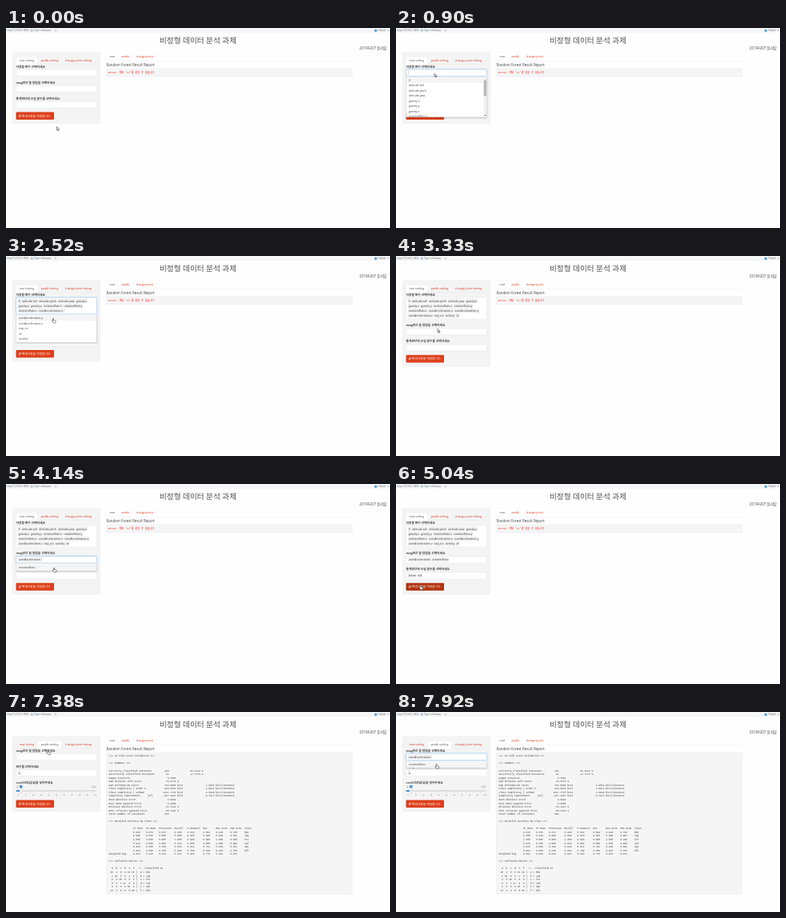
Recreate the animation shown at these times as an HTML page. Size 480 by 251 pixels, loop 8000 ms.

```html
<!DOCTYPE html>
<html lang="ko">
<head>
<meta charset="utf-8">
<title>비정형 데이터 분석 과제</title>
<style>
html, body { margin: 0; width: 100%; height: 100%; overflow: hidden; background: #fefefe; }
* { box-sizing: border-box; }
#stage {
  position: absolute; width: 1920px; height: 1004px; overflow: hidden;
  transform: scale(.25); transform-origin: 0 0; background: #fefefe;
  font: 14px/20px "Open Sans", "Noto Sans CJK KR", sans-serif; color: #444;
}
#stage > * { position: absolute; }
.bar { left: 0; top: 0; width: 100%; height: 24px; background: #f4f6f7; font-size: 11px; line-height: 24px; color: #666; }
.bar > * { position: absolute; top: 0; white-space: nowrap; }
.title { top: 36px; width: 100%; text-align: center; font-size: 38.5px; line-height: 52px; color: #505050; }
.author { top: 88px; right: 16px; font-size: 18px; line-height: 26px; }

.tabs { display: flex; gap: 2px; border-bottom: 1px solid #ddd; color: #dd3818; white-space: nowrap; }
.tabs span { padding: 0 15px; border: 1px solid transparent; border-bottom: 0; }
.tabs .on { background: #fff; color: #555; border-color: #ddd; border-radius: 4px 4px 0 0; margin-bottom: -1px; }
.side .tabs { position: absolute; left: 18px; right: 18px; top: 23px; line-height: 38px; }
.main-tabs { left: 502px; top: 120px; width: 1230px; line-height: 43px; }

.side {
  left: 32px; top: 120px; width: 440px; padding: 61px 17px 19px;
  background: #f4f4f4; border: 1px solid #e4e4e4; border-radius: 4px;
}
.group { margin-bottom: 20px; }
.group b { display: block; height: 20px; margin-bottom: 6px; font-size: 15px; white-space: nowrap; position: relative; }
.box { position: relative; }
.field {
  display: flex; flex-wrap: wrap; align-content: flex-start; min-height: 34px;
  padding: 5px 6px 2px 9px; background: #fff; border: 1px solid #ccc; border-radius: 4px;
}
.field.focus { border-color: #4fa3e0; box-shadow: 0 0 8px #66afe9aa; }
.field i { font-style: normal; height: 22px; margin: 0 3px 3px 0; padding: 1px 3px; background: #efefef; border-radius: 3px; }
.field u { width: 1px; height: 18px; margin-top: 2px; background: #777; }
.list {
  position: absolute; z-index: 5; top: 100%; left: 0; right: 0; margin-top: 2px; padding: 4px 0;
  max-height: 203px; overflow: hidden; background: #fff; border: 1px solid #bbb; box-shadow: 0 4px 8px #0003;
}
.list div { height: 26px; padding: 3px 13px; }
.list div:first-child { background: #f4f4f4; }
.scroll { position: absolute; right: 0; top: 0; width: 15px; height: 201px; background: #f1f1f1; }
.scroll::before { content: ""; position: absolute; top: 17px; left: 1px; right: 1px; height: var(--thumb); background: #b8b8b8; }
.scroll::after { content: ""; position: absolute; bottom: 5px; left: 3px; border: 5px solid transparent; border-top-color: #555; border-bottom: 0; }
.button {
  width: 190px; height: 38px; padding-left: 30px; position: relative; white-space: nowrap;
  background: #dc3f1b; color: #fff; border-radius: 4px; font-size: 15px; line-height: 37px;
}
.button.dark { background: #b2330f; }
.button svg { position: absolute; left: 12px; top: 12px; }

.slider { position: relative; height: 54px; font-size: 10px; line-height: 14px; }
.slider * { position: absolute; }
.slider span { transform: translateX(-50%); padding: 0 4px; border-radius: 3px; }
.track { top: 24px; left: 0; right: 0; height: 8px; background: #ddd; border-radius: 4px; }
.knob { top: 20px; width: 16px; height: 16px; margin-left: -8px; background: #f5f5f5; border: 1px solid #999; border-radius: 50%; }
.tick { top: 37px; width: 1px; height: 6px; background: #999; }

h4 { left: 502px; top: 172px; margin: 0; font-size: 17.7px; line-height: 24px; font-weight: 400; }
pre {
  left: 502px; top: 204px; width: 1230px; margin: 0; padding: 8px 11px; background: #f5f5f5;
  border: 1px solid #d6d6d6; border-radius: 4px;
  font: 11.9px/18.2px "Liberation Mono", "Noto Sans Mono CJK KR", "Noto Sans CJK KR", monospace;
}
pre.error { padding: 10px 9px; height: 40px; font-size: 12.6px; color: #f01010; }
#cursor { left: 0; top: 0; overflow: visible; z-index: 9; }
#cursor path { fill: #fff; stroke: #222; stroke-width: 2; }
</style>
</head>
<body>
<div id="stage">
  <div class="bar">
    <span style="left:6px">http://127.0.0.1:3896</span>
    <span style="left:116px;top:4px;width:1px;height:16px;background:#ccc"></span>
    <span style="left:125px;top:7px;width:10px;height:10px;border:2px solid #5b8fc0"></span>
    <span style="left:141px">Open in Browser</span>
    <span style="left:243px;top:7px;width:10px;height:10px;border:2px solid #9ab;border-radius:50%"></span>
    <span style="left:1842px;top:6px;width:13px;height:13px;border-radius:50%;background:#4b9bd0"></span>
    <span style="left:1861px">Publish</span>
    <span style="left:1907px;top:10px;border:4px solid transparent;border-top-color:#666"></span>
  </div>
  <div class="title">비정형 데이터 분석 과제</div>
  <div class="author">20194207 윤서담</div>
  <div class="side" id="side"></div>
  <div class="tabs main-tabs"><span class="on">mat</span><span>peakk</span><span>change point</span></div>
  <h4>Random Forest Result Report</h4>
  <pre id="report"></pre>
  <svg id="cursor" width="1" height="1"><path/></svg>
</div>
<script>
const LOOP = 8000, STEP = 90;
const RECALC = 5400, RESULT = 7020, SWITCH = 7290;
const $ = id => document.getElementById(id);
const axes = (name, letters = 'xyz') => [...letters].map(a => `${name}.${a}`);

const variables = {
  label: '사용할 변수 선택하세요', open: 900, close: 3150,
  options: ['X', 'attitude.roll', 'attitude.pitch', 'attitude.yaw', ...axes('gravity'),
    ...axes('rotationRate'), ...axes('userAcceleration'), 'exp_no', 'id', 'activity'],
  picks: [[1080, 'X'], [1260, 'attitude.roll'], [1440, 'attitude.pitch'], [1530, 'attitude.yaw'],
    [1710, 'gravity.x'], [1800, 'gravity.z'], [1980, 'gravity.y'],
    [2070, 'rotationRate.x'], [2160, 'rotationRate.y'], [2250, 'rotationRate.z'],
    [2430, 'userAcceleration.x'], [2610, 'userAcceleration.y'], [2700, 'userAcceleration.z'],
    [2790, 'exp_no'], [2970, 'activity'], [3060, 'id']]
};
const magnitude = {
  label: 'mag연산 할 컬럼을 선택하세요', open: 3420, close: 4320,
  options: ['userAcceleration', 'rotationRate'],
  picks: [[3960, 'userAcceleration'], [4230, 'rotationRate']]
};
const statistics = {
  label: '통계연산에 쓰일 함수를 선택하세요', open: 4410, close: 4950,
  options: ['mean', 'std', 'max', 'min', 'median', 'var', 'mad', 'skewness', 'kurtosis', 'sum'],
  picks: [[4590, 'mean'], [4770, 'std']]
};
const peakColumns = { ...magnitude, open: 7560, close: LOOP, picks: [[7830, 'userAcceleration']] };
const peakVariable = { label: '변수를 선택하세요', options: [], picks: [[0, 'a']] };

function selectBox({ label, options, picks, open, close }, t) {
  const chosen = picks.filter(p => p[0] <= t).map(p => p[1]);
  const rest = options.filter(o => !chosen.includes(o));
  const active = t >= open && t < close;
  const height = rest.length * 26 + 8;
  const scroll = height > 201 ? `<span class="scroll" style="--thumb:${167 * 201 / height}px"></span>` : '';
  const list = active && rest.length
    ? `<div class="list">${rest.map(o => `<div>${o}</div>`).join('')}${scroll}</div>` : '';
  return `<div class="group"><b>${label}</b><div class="box"><div class="field ${active ? 'focus' : ''}">` +
    chosen.map(c => `<i>${c}</i>`).join('') + (active ? '<u></u>' : '') + `</div>${list}</div></div>`;
}

function slider(value) {
  const at = v => 10 + v * 3.85;
  const badge = (x, text, style) => `<span style="left:${x}px;top:0;${style}">${text}</span>`;
  let scale = '';
  for (let v = 0; v <= 100; v += 5) {
    scale += `<em class="tick" style="left:${at(v)}px"></em>`;
    if (v % 10 === 0) scale += `<span style="left:${at(v)}px;top:42px">${v}</span>`;
  }
  return '<div class="group"><b>cred(신뢰값)값을 넣어주세요</b><div class="slider">' +
    badge(8, 0, 'background:#e1e1e1') + badge(at(value), value, 'background:#428bca;color:#fff') +
    badge(388, 100, 'background:#e1e1e1;color:#888') +
    `<em class="track"></em><em class="track" style="right:auto;width:${at(value)}px;background:#428bca"></em>` +
    `${scale}<em class="knob" style="left:${at(value)}px"></em></div></div>`;
}

const button = dark => `<div class="button ${dark ? 'dark' : ''}"><svg width="14" height="14">
  <path d="M2 6a5 5 0 0 1 9-2M12 8a5 5 0 0 1-9 2" fill="none" stroke="#fff" stroke-width="2.4"/>
  <path d="M13 0v6H7zM1 14V8h6z" fill="#fff"/></svg>변경사항을 적용합니다.</div>`;

function sidebar(t) {
  const peak = t >= SWITCH;
  const tabs = ['mat setting', 'peakk setting', 'change point setting']
    .map((name, i) => `<span class="${i === +peak ? 'on' : ''}">${name}</span>`).join('');
  const body = peak
    ? selectBox(peakColumns, t) + selectBox(peakVariable, t) + slider(4) + button(false)
    : [variables, magnitude, statistics].map(s => selectBox(s, t)).join('') + button(t >= 4950);
  return `<div class="tabs">${tabs}</div>${body}`;
}

function buildReport() {
  const classes = ['dws', 'jog', 'sit', 'std', 'ups', 'wlk'];
  const matrix = [[45, 2, 0, 0, 10, 15], [1, 46, 0, 0, 1, 0], [0, 0, 48, 0, 0, 0],
    [0, 0, 1, 47, 0, 0], [8, 0, 0, 0, 60, 4], [13, 4, 0, 0, 5, 50]];
  const roc = [.915, .998, 1, 1, .969, .920], prc = [.736, .981, .999, .998, .881, .762];
  const sum = a => a.reduce((x, y) => x + y, 0);
  const sizes = matrix.map(sum), total = sum(sizes);
  const hits = sum(matrix.map((row, i) => row[i]));
  const widths = [9, 9, 11, 9, 11, 9, 10, 10];
  const line = (head, cells, tail) => head.padEnd(17) + cells.map((c, i) => c.padEnd(widths[i])).join('') + tail;
  const stats = matrix.map((row, i) => {
    const tp = row[i], fn = sizes[i] - tp, fp = sum(matrix.map(r => r[i])) - tp, tn = total - tp - fn - fp;
    const recall = tp / sizes[i], precision = tp / (tp + fp);
    const mcc = (tp * tn - fp * fn) / Math.sqrt((tp + fp) * (tp + fn) * (tn + fp) * (tn + fn));
    return [recall, fp / (fp + tn), precision, recall, 2 * precision * recall / (precision + recall), mcc, roc[i], prc[i]];
  });
  const mean = widths.map((_, k) => sum(stats.map((s, i) => s[k] * sizes[i])) / total);
  const fixed = a => a.map(v => v.toFixed(3));
  // values line up on the decimal point
  const align = (value, width) => ' '.repeat(width - String(value).split('.')[0].length) + value;
  const item = (name, value, extra = '') => (name.padEnd(35) + align(value, 7)).padEnd(57) + extra;
  const info = (name, bits) => (name.padEnd(35) + align(bits.toFixed(4), 7) + ' bits').padEnd(66) +
    align((bits / total).toFixed(4), 3) + ' bits/instance';
  const percent = n => (n / total * 100).toFixed(4) + ' %';
  return ['=== 10 Fold Cross Validation ===', '', '=== Summary ===', '',
    item('Correctly Classified Instances', hits, percent(hits)),
    item('Incorrectly Classified Instances', total - hits, percent(total - hits)),
    item('Kappa statistic', '0.7851'),
    item('K&B Relative Info Score', '76.3776 %'),
    info('K&B Information Score', 703.0986),
    info('Class complexity | order 0', 920.6079),
    info('Class complexity | scheme', 1207.7776),
    info('Complexity improvement     (Sf)', -287.1697),
    item('Mean absolute error', '0.0929'),
    item('Root mean squared error', '0.2068'),
    item('Relative absolute error', '33.7112 %'),
    item('Root relative squared error', '55.7432 %'),
    item('Total Number of Instances', total), '',
    '=== Detailed Accuracy By Class ===', '',
    line('', ['TP Rate', 'FP Rate', 'Precision', 'Recall', 'F-Measure', 'MCC', 'ROC Area', 'PRC Area'], 'Class'),
    ...stats.map((s, i) => line('', fixed(s), classes[i])),
    line('Weighted Avg.', fixed(mean), ''), '',
    '=== Confusion Matrix ===', '',
    [...'abcdef'].map(c => '  ' + c).join('') + '   <-- classified as',
    ...matrix.map((r, i) => r.map(n => String(n).padStart(3)).join('') + ` |  ${'abcdef'[i]} = ${classes[i]}`)
  ].join('\n');
}

// an empty line keeps the first entries apart
const report = buildReport().replace('=== Detailed', '\n=== Detailed').replace('\n\n\n', '\n\n');
const errorText = "Error: 객체 'tr'를 찾을 수 없습니다";

// time, x, y, hand shape from here on
const path = [
  [0, 63.5, 124, 0], [180, 58, 136, 0], [360, 50, 141, 0], [720, 48, 70, 0], [810, 48, 57, 0],
  [900, 48, 57, 0], [1080, 60, 66, 1], [1620, 62.5, 66.5, 1], [1800, 62, 69, 1], [2430, 59, 78, 1],
  [2520, 58.5, 78.5, 1], [3060, 58, 84, 1], [3240, 54, 88, 0], [3420, 50, 95, 0], [3600, 56, 104, 1],
  [4140, 59.5, 105, 1], [4230, 59.5, 105, 1], [4410, 52, 115, 0], [4590, 40, 125, 1], [4860, 36, 127, 1],
  [5040, 30, 127, 1], [5400, 30, 127, 0], [6120, 133, 56, 0], [6300, 130, 56, 0], [6480, 129.5, 52, 0],
  [6840, 130, 52, 0], [7020, 130, 52, 0], [7290, 54, 40, 1], [7470, 50, 56, 0], [7560, 50, 56, 0],
  [7650, 50, 65, 1], [8000, 50, 65.5, 1]
];
const ARROW = 'M0 0V17L4 13L7 20L10 19L7 12H13Z';
const HAND = 'M0 2Q0 0 2 0T4 2V9L13 11Q15 12 15 14L13 22H3L-5 13Q-4 10 0 13Z';

function moveCursor(t) {
  const i = path.findIndex(p => p[0] > t) - 1;
  const [t0, x0, y0, hand] = path[i], [t1, x1, y1] = path[i + 1];
  const u = (t - t0) / (t1 - t0), k = u * u * (3 - 2 * u);
  const shape = $('cursor').firstElementChild;
  shape.setAttribute('d', hand ? HAND : ARROW);
  shape.setAttribute('transform', `translate(${4 * (x0 + (x1 - x0) * k)} ${4 * (y0 + (y1 - y0) * k)})`);
}

let shown = -1;
function draw(now) {
  const t = Math.floor(now % LOOP / STEP) * STEP;
  if (t !== shown) {
    shown = t;
    const done = t >= RESULT;
    $('side').innerHTML = sidebar(t);
    $('report').className = done ? '' : 'error';
    $('report').textContent = done ? report : errorText;
    $('report').style.opacity = done ? 1 : 1 - .75 * Math.min(1, Math.max(0, (t - RECALC - 300) / 270));
    moveCursor(t);
  }
  requestAnimationFrame(draw);
}
draw(0);
</script>
</body>
</html>
```
